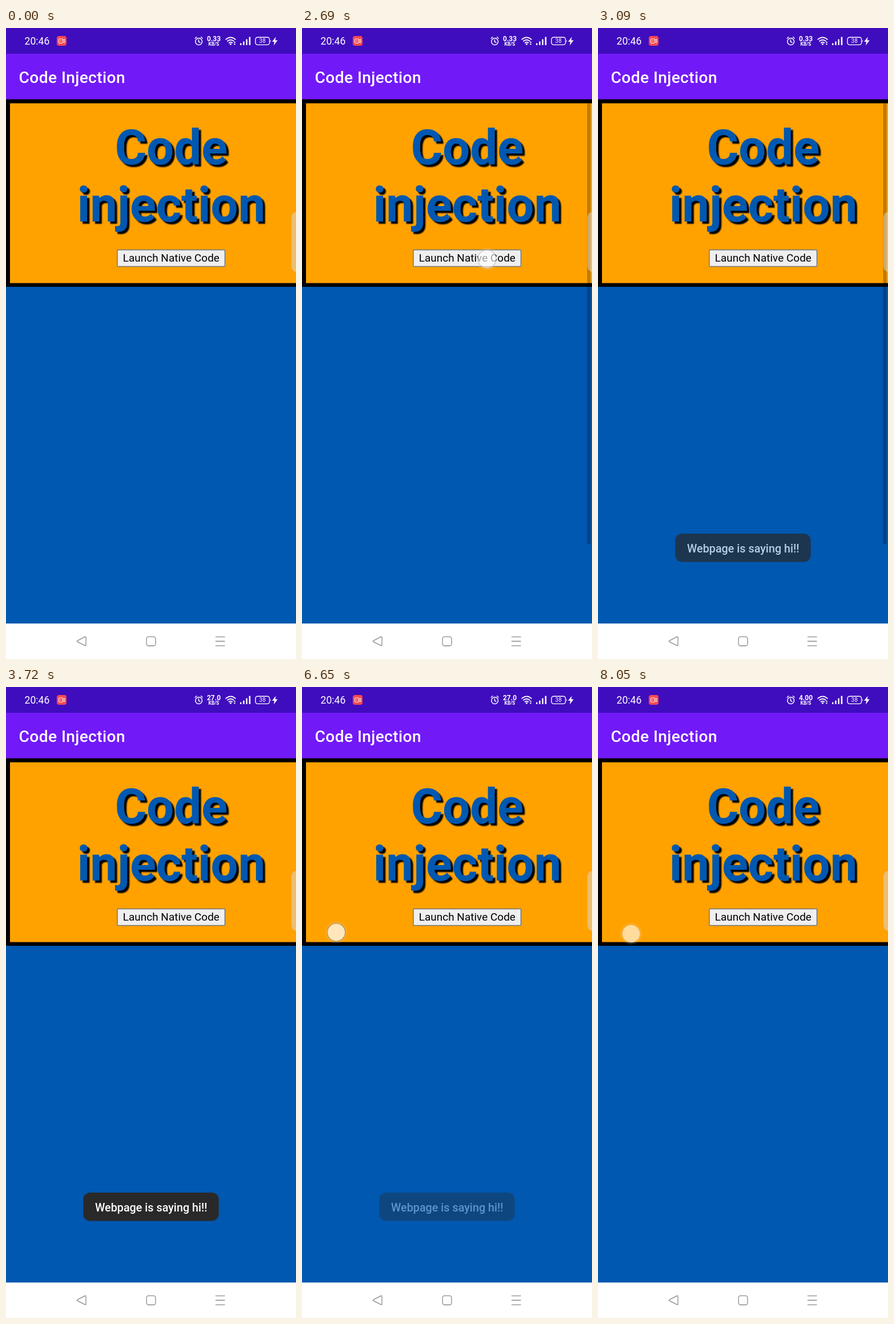
Recreate the animation shown at these times as an HTML page. Size 508 by 1102 pixels, loop 8100 ms.

```html
<!DOCTYPE html>
<html lang="en">
<head>
<meta charset="utf-8">
<title>Code Injection</title>
<style>
  html, body { margin: 0; width: 100%; height: 100%; overflow: hidden; background: #fff; }
  body { position: relative; font-family: Roboto, sans-serif; }
  svg { display: block; position: absolute; left: 0; top: 0; }
  text { font-family: Roboto, sans-serif; }
  h1 {
    position: absolute; left: 89.5px; top: 160px; width: 400px; margin: 0;
    font: bold 85px/99.7px Roboto, sans-serif; text-align: center;
    color: #0058b0; text-shadow: 4.2px 4.2px 2px #000;
  }
  .mid { text-anchor: middle; }
  .title { font-size: 28.2px; font-weight: 500; letter-spacing: .0125em; }
  .note { font-size: 19.75px; font-weight: 500; }
  .rate { font-size: 12px; font-weight: 700; }

  /* one loop: 1% = 81ms */
  .anim { animation: 8.1s linear infinite both; }
  #rateA { animation-name: rateA; animation-timing-function: step-end; }
  #rateB { animation-name: rateB; animation-timing-function: step-end; }
  #rateC { animation-name: rateC; animation-timing-function: step-end; }
  #tap { animation-name: tap; animation-timing-function: step-end; }
  #hold { animation-name: hold; animation-timing-function: step-end; }
  #drift { animation-name: drift; }
  #press { animation-name: press; }
  #ring { animation-name: ring; }
  #bar { animation-name: bar; }
  #toast { animation-name: toast; }

  @keyframes rateA { 0% { opacity: 1 } 43.704%, 100% { opacity: 0 } }
  @keyframes rateB { 0% { opacity: 0 } 43.704% { opacity: 1 } 92.963%, 100% { opacity: 0 } }
  @keyframes rateC { 0% { opacity: 0 } 92.963%, 100% { opacity: 1 } }
  @keyframes tap { 0% { opacity: 0 } 26.914% { opacity: 1 } 34.568%, 100% { opacity: 0 } }
  @keyframes hold { 0% { opacity: 0 } 80.741%, 100% { opacity: 1 } }
  @keyframes drift {
    0%, 82.4% { transform: translate(60px, 428.5px) }
    87%, 100% { transform: translate(58px, 431px) }
  }
  @keyframes press { 0%, 82.4% { opacity: .66 } 87%, 100% { opacity: .5 } }
  @keyframes ring { 0%, 82.4% { opacity: .6 } 87%, 100% { opacity: .12 } }
  @keyframes bar {
    0% { opacity: 0; animation-timing-function: step-end }
    33.21%, 43.4% { opacity: 1 }
    45.926%, 100% { opacity: 0 }
  }
  @keyframes toast {
    0% { opacity: 0 }
    35.185% { opacity: 0; animation-timing-function: cubic-bezier(.333, .667, .667, 1) }
    41.605%, 78.15% { opacity: 1 }
    84.32%, 100% { opacity: 0 }
  }
</style>
</head>
<body>
<svg width="508" height="1102" viewBox="0 0 508 1102">
  <defs>
    <radialGradient id="glow">
      <stop offset=".76" stop-color="#fff" stop-opacity=".38"/>
      <stop offset="1" stop-color="#fff" stop-opacity="0"/>
    </radialGradient>
  </defs>

  <!-- bars and page -->
  <rect width="508" height="45" fill="#3f0dbd"/>
  <rect y="45" width="508" height="80" fill="#7219f8"/>
  <rect y="124.5" width="508" height="328" fill="#000"/>
  <rect x="7" y="131.5" width="501" height="314" fill="#ffa200"/>
  <rect y="452" width="508" height="588" fill="#0058b0"/>
  <text class="title" x="22.6" y="95.8" fill="#fff">Code Injection</text>

  <!-- status bar -->
  <g fill="#fff">
    <text x="32.5" y="29" font-size="17.6">20:46</text>
    <rect x="89" y="14" width="17" height="17" rx="4" fill="#f9484d"/>
    <g fill="none" stroke="#fff" stroke-width="1">
      <rect x="92.6" y="19" width="7" height="7.4" rx="1"/>
      <path d="M99.8 21.6 L102.8 19.6 V25.8 L99.8 23.8"/>
      <path d="M95 22.7 H97.4"/>
    </g>

    <g fill="none" stroke="#fff" stroke-width="1.5" stroke-linecap="round">
      <circle cx="337.7" cy="23.6" r="5.9"/>
      <path d="M337.4 20.5 V24 L340 25.2 M331.3 18 L333.8 15.8 M344.1 18 L341.6 15.8"/>
    </g>

    <g class="rate mid">
      <text id="rateA" class="anim" x="364" y="22.8">0.33</text>
      <text id="rateB" class="anim" x="364" y="22.8">27.0</text>
      <text id="rateC" class="anim" x="364" y="22.8">4.00</text>
      <text x="364" y="31" font-size="8.3">KB/S</text>
    </g>

    <g fill="none" stroke="#fff" stroke-width="1.8">
      <path d="M384.6 20.4 Q393.5 12.4 402.4 20.4"/>
      <path d="M387.4 23.4 Q393.5 18 399.6 23.4"/>
      <path d="M390.2 26.2 Q393.5 23.4 396.8 26.2"/>
    </g>
    <path d="M391.4 27.8 Q393.5 26.2 395.6 27.8 L393.5 30.2 Z"/>
    <path d="M398.6 26 L400.5 23.6 L402.4 26 Z M398.6 27.6 L400.5 30 L402.4 27.6 Z"/>

    <rect x="410" y="26.4" width="2.4" height="3.6" rx=".8"/>
    <rect x="415.2" y="23.4" width="2.4" height="6.6" rx=".8"/>
    <rect x="420.4" y="19.6" width="2.4" height="10.4" rx=".8"/>
    <rect x="425.6" y="15.6" width="2.6" height="14.4" rx=".8"/>

    <rect x="437" y="16.2" width="24.6" height="13.2" rx="3.8" fill="none" stroke="#fff" stroke-width="1.4"/>
    <path d="M463.2 20.6 Q465 22.8 463.2 25 Z"/>
    <text class="mid" x="449.2" y="26.4" font-size="10">38</text>
    <path d="M472.6 15.4 L466.2 24 H470.2 L469 30.4 L475.8 21.4 H471.6 Z"/>
  </g>

  <!-- web button -->
  <rect x="195" y="387.5" width="188.5" height="29" rx="1" fill="#efefef" stroke="#767676" stroke-width="1.5"/>
  <text class="mid" x="289.3" y="408.4" font-size="19" fill="#000">Launch Native Code</text>

  <!-- scroll bar and edge handle -->
  <rect id="bar" class="anim" x="499.5" y="131.5" width="6" height="770" fill="#000" fill-opacity=".25"/>
  <path d="M509 321.5 Q500.5 322 500.5 332 V415 Q500.5 425 509 425.5 Z"
        fill="#dcdcdc" fill-opacity=".5" stroke="#d8d0c0" stroke-opacity=".45"/>

  <!-- touches -->
  <g id="tap" class="anim">
    <g transform="translate(324 403.5)">
      <circle r="20" fill="url(#glow)"/>
      <circle r="15.5" fill="#fff" fill-opacity=".4"/>
      <circle r="16" fill="none" stroke="#8c8a96" stroke-opacity=".4" stroke-width="1.4"/>
    </g>
  </g>
  <g id="hold" class="anim">
    <g id="drift" class="anim">
      <circle r="20" fill="url(#glow)" opacity=".6"/>
      <circle id="press" class="anim" r="15.3" fill="#fff"/>
      <circle id="ring" class="anim" r="15.8" fill="none" stroke="#8f8270" stroke-width="1.6"/>
    </g>
  </g>

  <!-- toast -->
  <g id="toast" class="anim">
    <rect x="135.3" y="883" width="237.4" height="49.5" rx="12" fill="#292929"/>
    <text class="note mid" x="254.3" y="915.6" fill="#fff">Webpage is saying hi!!</text>
  </g>

  <!-- navigation -->
  <rect y="1040" width="508" height="62" fill="#fff"/>
  <g fill="none" stroke="#8a8a8a" stroke-width="1.3" stroke-linejoin="round">
    <path d="M125 1070.2 L138.6 1063.2 Q140 1062.8 140 1064.2 V1077.8 Q140 1079.2 138.6 1078.6 L125 1071.8 Q123.8 1071 125 1070.2 Z"/>
    <rect x="246.2" y="1063.2" width="15.8" height="15.8" rx="3.6"/>
    <path d="M367 1063.3 H383.5 M367 1071 H383.5 M367 1078.8 H383.5"/>
  </g>
</svg>
<h1>Code<br>injection</h1>
</body>
</html>
```
